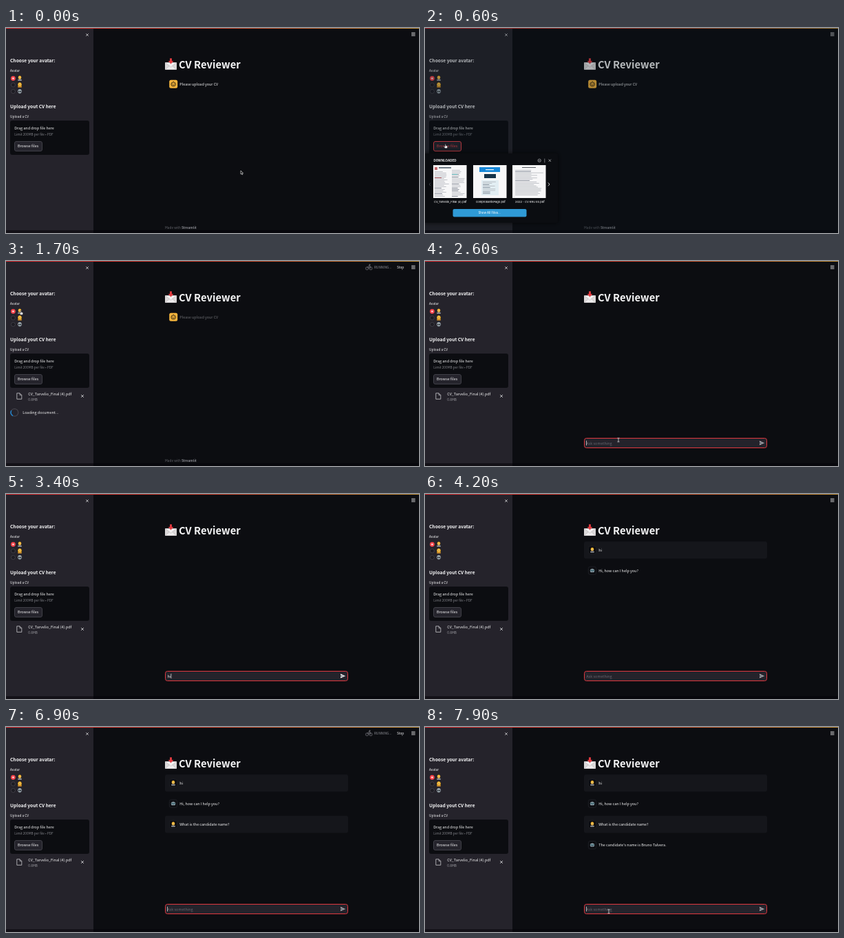
Animation of 600x299 px, one loop 8 s. Source, as an HTML page with a canvas:

```html
<!DOCTYPE html>
<html lang="en">
<head>
<meta charset="utf-8">
<title>CV Reviewer</title>
<style>
  html, body { margin: 0; width: 100%; height: 100%; overflow: hidden; background: #0c0d11; }
  canvas { display: block; width: 600px; height: 299px; }
</style>
</head>
<body>
<canvas id="stage" width="600" height="299"></canvas>
<script>
const ctx = document.getElementById('stage').getContext('2d');
const LOOP = 8000;
const SANS = '"Noto Sans CJK JP", "Noto Sans CJK SC", "Noto Sans CJK", Lato, sans-serif';
const UI = 'Inter, sans-serif';
const WHITE = '#f6f6f7', GRAY = '#85868c', RED = '#f2434a';
const BODY = 6.05, SMALL = 5.3;
const LATIN_RATIO = 1.117; // Latin letters in the CJK face are drawn this much larger
const FILE = 'CV_Tarvelio_Final (4).pdf';
const QUESTION = 'What is the candidate name?';

// Moments of the session, in ms
const T = {
  popup: 500, pick: 1080, uploaded: 1250, loading: 1350, ready: 2180, focus: 2480,
  send1: 3550, reply1: 4080, type2: 4900, send2: 6850, reply2: 7450
};

const MOUSE = [
  [0, 341, 208], [100, 341, 208], [430, 30, 172], [650, 30, 172], [900, 38, 226],
  [1150, 38, 226], [1600, 22, 75], [1850, 22, 75], [2400, 281, 261], [2800, 281, 261]
];
const MOUSE_END = [[7550, 290, 273], [7850, 267, 269], [8000, 267, 269]];

function along(keys, t) {
  let i = 1;
  while (i < keys.length - 1 && t > keys[i][0]) i++;
  const [t0, x0, y0] = keys[i - 1], [t1, x1, y1] = keys[i];
  let k = Math.min(1, Math.max(0, (t - t0) / (t1 - t0)));
  k = k * k * (3 - 2 * k);
  return [x0 + (x1 - x0) * k, y0 + (y1 - y0) * k];
}

// Text is laid out at ten times its size so that advances stay fractional.
function text(str, x, y, size = BODY, color = WHITE, weight = 400, family = SANS) {
  const px = size / (family === SANS ? LATIN_RATIO : 1);
  ctx.save();
  ctx.translate(x, y);
  ctx.scale(0.1, 0.1);
  ctx.font = `${weight} ${px * 10}px ${family}`;
  ctx.fillStyle = color;
  ctx.fillText(str, 0, 0);
  const width = ctx.measureText(str).width / 10;
  ctx.restore();
  return width;
}

function rect(x, y, w, h, color) {
  ctx.fillStyle = color;
  ctx.fillRect(x, y, w, h);
}

function box(x, y, w, h, r, fill, stroke) {
  ctx.beginPath();
  ctx.roundRect(x, y, w, h, r);
  paint(fill, stroke);
}

function paint(fill, stroke, width = 1) {
  if (fill) { ctx.fillStyle = fill; ctx.fill(); }
  if (stroke) { ctx.strokeStyle = stroke; ctx.lineWidth = width; ctx.stroke(); }
}

function oval(x, y, rx, ry, fill, stroke, width) {
  ctx.beginPath();
  ctx.ellipse(x, y, rx, ry, 0, 0, Math.PI * 2);
  paint(fill, stroke, width);
}

function poly(points, fill, stroke, width, open) {
  ctx.beginPath();
  points.forEach(([x, y]) => ctx.lineTo(x, y));
  if (!open) ctx.closePath();
  paint(fill, stroke, width);
}

function cross(x, y, r, color, width = 0.8) {
  poly([[x - r, y - r], [x + r, y + r]], null, color, width, true);
  poly([[x - r, y + r], [x + r, y - r]], null, color, width, true);
}

function at(x, y, draw, ...args) {
  ctx.save();
  ctx.translate(x, y);
  draw(...args);
  ctx.restore();
}

function person(longHair) {
  if (longHair) box(-2.7, -3, 5.4, 5.6, 2, '#e8a81c');
  box(-3, 1.7, 6, 2.1, 1, longHair ? '#c98a2a' : '#8b8f98');
  oval(0, -1.2, 2.3, 2.5, '#f3b02c');
  oval(0, -0.4, 1.6, 1.9, '#ffd264');
  rect(-0.9, -0.7, 0.6, 0.6, '#5a3b16');
  rect(0.4, -0.7, 0.6, 0.6, '#5a3b16');
  rect(-0.6, 0.6, 1.2, 0.4, '#9b5b2a');
}

function alien() {
  oval(0, -0.2, 2.8, 3.1, '#a9b6bd');
  oval(-1.2, 0.1, 0.9, 1.1, '#15181d');
  oval(1.2, 0.1, 0.9, 1.1, '#15181d');
  rect(-0.6, 1.8, 1.2, 0.4, '#4b5459');
}

function robot() {
  rect(-0.3, -3.4, 0.6, 1.4, '#9aa7ae');
  box(-2.8, -2.2, 5.6, 4.6, 1.3, '#a7bcc6');
  box(-3.4, -0.8, 6.8, 1.6, 0.6, '#56747f');
  oval(-1.2, -0.4, 0.8, 0.8, '#1d4d58');
  oval(1.2, -0.4, 0.8, 0.8, '#1d4d58');
  rect(-1.4, 1.1, 2.8, 0.6, '#34424a');
}

function robotBadge() {
  box(-6, -6, 12, 12, 2.5, '#f3b33c');
  oval(0, 0.3, 3.3, 3, null, '#33260f', 0.9);
  oval(-1.3, 0, 0.7, 0.7, '#33260f');
  oval(1.3, 0, 0.7, 0.7, '#33260f');
  rect(-1.2, 1.5, 2.4, 0.6, '#33260f');
  rect(-0.4, -4, 0.8, 1.4, '#33260f');
}

function envelope() {
  box(0, 6, 17, 11, 1, '#dcd9da');
  poly([[0.5, 16.5], [6.5, 11], [10.5, 11], [16.5, 16.5]], '#eeeced', '#b5b0b3', 0.6);
  poly([[0.5, 6.5], [8.5, 13], [16.5, 6.5]], '#f3f1f2', '#b5b0b3', 0.6);
  poly([[7, 0.3], [10, 0.3], [10, 4], [12.4, 4], [8.5, 8.6], [4.6, 4], [7, 4]], '#e03a3f');
}

function arrowCursor() {
  poly([[0, 0], [0, 5.2], [1.2, 4.2], [2, 6], [2.9, 5.6], [2.1, 3.9], [3.7, 3.8]], '#111', '#eee', 0.6);
}

function handCursor() {
  poly([[-0.9, -2.8], [0.1, -2.8], [0.2, -0.4], [2.7, 0.2], [2.6, 2.2], [1.9, 3.5],
        [-0.9, 3.5], [-2.7, 0.9], [-2.1, 0.3], [-0.9, 1.2]], '#f5f5f5', '#15151a', 0.5);
}

function beamCursor() {
  rect(-0.4, -2.8, 0.8, 5.6, '#dcdcde');
  rect(-1.6, -3.2, 3.2, 0.7, '#dcdcde');
  rect(-1.6, 2.5, 3.2, 0.7, '#dcdcde');
}

function background() {
  rect(0, 0, 600, 299, '#0c0d11');
  rect(0, 0, 127, 299, '#25232b');
  rect(0, 295, 600, 4, 'rgba(4,2,8,0.55)');
  const line = ctx.createLinearGradient(0, 0, 600, 0);
  line.addColorStop(0, '#d42a30');
  line.addColorStop(0.5, '#c8402d');
  line.addColorStop(1, '#b98a35');
  rect(0, 0, 600, 1, line);
}

function sidebar(t) {
  cross(118, 10, 1.8, '#d6d6d9');
  text('Choose your avatar:', 6, 50, 7.45, WHITE, 700);
  text('Avatar', 6, 64.4, SMALL);
  [73.5, 83, 92.5].forEach((y, i) => {
    if (i) oval(10.4, y, 3, 3, '#1d1c23', '#4b4a52', 0.7);
    else {
      oval(10.4, y, 3.4, 3.4, RED);
      oval(10.4, y, 1.3, 1.3, '#ffe3e3');
    }
  });
  at(20, 73.3, person, false);
  at(20, 83, person, true);
  at(20, 92.5, alien);

  text('Upload yout CV here', 6, 116.7, 7.45, WHITE, 700);
  text('Upload a CV', 6, 131, SMALL + 0.1);
  box(6, 135, 115, 50, 3, '#0c0d11');
  text('Drag and drop file here', 12.3, 148.1);
  text('Limit 200MB per file • PDF', 12.3, 157.3, SMALL, GRAY);
  const hover = t > 400 && t < 700;
  box(12.5, 165.5, 40, 14, 2.5, '#25242c', hover ? RED : '#3f3f47');
  text('Browse files', 17, 174.2, BODY, hover ? RED : WHITE);

  if (t >= T.uploaded) {
    poly([[15.8, 192.8], [20, 192.8], [22.8, 195.6], [22.8, 201.4], [15.8, 201.4]], null, '#c9c9cd', 0.8);
    poly([[20, 192.8], [20, 195.6], [22.8, 195.6]], null, '#c9c9cd', 0.7, true);
    text(FILE, 32.3, 196.2);
    text('0.8MB', 32.3, 204.3, SMALL, '#a0a0a6');
    cross(111, 197, 1.9, '#e4e4e6');
  }
  if (t >= T.loading && t < T.ready) {
    oval(12.4, 221, 5.4, 5.4, null, '#45444c', 1.2);
    const a = 2 + (t - 1700) / 1000 * Math.PI * 2;
    ctx.beginPath();
    ctx.arc(12.4, 221, 5.4, a, a + 1.7);
    paint(null, '#2187d3', 1.4);
    text('Loading document...', 24.3, 223.1);
  }
}

function toolbar(t) {
  for (const y of [7, 9, 11]) rect(589, y - 0.4, 5.5, 0.9, '#dadadc');
  const busy = (t >= T.loading && t < T.ready) || (t >= T.send1 && t < T.reply1) ||
    (t >= T.send2 && t < T.reply2);
  if (!busy) return;
  oval(524.5, 10.8, 2.1, 2.1, null, '#77787e', 0.7);
  oval(530, 10.8, 2.1, 2.1, null, '#77787e', 0.7);
  poly([[524.5, 10.8], [526, 8], [529, 8], [527.3, 10.8], [526, 8]], null, '#77787e', 0.6, true);
  poly([[530, 10.8], [528.6, 6.8], [526.6, 6.2]], null, '#77787e', 0.7, true);
  oval(528.5, 5.5, 0.9, 0.9, '#77787e');
  text('RUNNING...', 535, 11.2, SMALL, '#919299');
  text('Stop', 568, 11.2, SMALL, WHITE, 500);
}

function message(str, y, isUser) {
  if (isUser) box(231, y - 12.5, 266, 25, 3, '#15161b');
  box(237.3, y - 5.7, 11.4, 11.4, 2.5, '#0c0d11', '#1d1e24');
  at(243, y, isUser ? person : robot);
  text(str, 252.3, y + 1.9);
}

function draft(t) {
  if (t >= 2900 && t < T.send1) return 'hi'.slice(0, t < 3150 ? 1 : 2);
  if (t < T.type2 || t >= T.send2) return '';
  const slow = Math.min(8, 1 + Math.floor((t - T.type2) / 100));
  return QUESTION.slice(0, slow + Math.max(0, Math.ceil((t - 5750) / 45)));
}

function promptBar(t) {
  const typed = draft(t);
  const focused = t >= T.focus;
  box(231.5, 258.5, 265, 14, 3, '#24232b', focused ? '#e0383f' : '#24232b');
  const width = text(typed || 'Ask something', 234.4, 267.6, BODY, typed ? WHITE : '#67676f');
  const since = t >= T.send2 ? T.send2 : t >= T.send1 ? T.send1 : T.focus;
  if (focused && (typed || (t - since) % 1000 < 500)) {
    rect(typed ? 234.8 + width : 234, 262, 0.7, 7, '#e6e6e8');
  }
  poly([[486, 262.2], [493.2, 265.4], [486, 268.6], [486, 266], [490.5, 265.4], [486, 264.8]],
    typed ? '#e8e8ea' : '#a4a4aa');
}

function mainPane(t) {
  at(231, 44, envelope);
  text('CV Reviewer', 251, 59.2, 16.5, WHITE, 700);
  if (t < T.ready) {
    at(243.2, 81.7, robotBadge);
    text('Please upload your CV', 252.3, 83.6, BODY, t < T.loading ? WHITE : '#6d6e73');
    const w = text('Made with ', 231, 293.4, SMALL, '#65666c');
    text('Streamlit', 231 + w, 293.4, SMALL, '#8b8c92', 700);
    return;
  }
  if (t >= T.send1) message('hi', 81.7, true);
  if (t >= T.reply1) message('Hi, how can I help you?', 111.8, false);
  if (t >= T.send2) message(QUESTION, 142, true);
  if (t >= T.reply2) message("The candidate's name is Bruno Talvera.", 172.2, false);
  promptBar(t);
}

// Rows of grey strokes that read as a printed page
function textRows(x, y, w, rows, step, seed) {
  for (let i = 0; i < rows; i++) {
    const r = Math.abs(Math.sin((i + 1) * 12.9898 + seed) * 43758.5) % 1;
    rect(x, y + i * step, w * (0.45 + 0.55 * r), 0.7, r < 0.2 ? '#5c6472' : '#a9adb3');
  }
}

function thumbnails() {
  for (const x of [12, 70, 127]) rect(x, 200, 48.5, 48, '#f7f7f8');
  rect(20, 203, 18, 1.6, '#52606d');
  rect(14, 203, 4, 4, '#c66b70');
  textRows(14, 209, 21, 19, 2, 1);
  textRows(39, 207, 19, 20, 2, 4);
  rect(39, 213, 8, 1, '#4aa1a8');
  rect(14, 218, 10, 1, '#c66b70');

  rect(79, 203, 30, 7, '#1687d8');
  rect(86, 213, 17, 6, '#163349');
  rect(82, 222, 25, 22, '#e2eef3');
  textRows(84, 224, 20, 9, 2.1, 7);
  rect(88, 206, 12, 1.2, '#e8f6ff');

  rect(141, 203, 20, 1, '#555a61');
  textRows(131, 207, 41, 20, 1.9, 2);
}

function popup() {
  ctx.save();
  ctx.shadowColor = 'rgba(0,0,0,0.7)';
  ctx.shadowBlur = 7;
  box(-4, 183, 197, 101, 3, '#0b0d11');
  ctx.restore();
  text('DOWNLOADED', 12.5, 195.2, 4.5, '#e9e9ea', 700, UI);
  oval(166.2, 193.3, 2.2, 2.2, null, '#b9babd', 0.7);
  rect(165.2, 193, 2, 0.7, '#b9babd');
  rect(173.5, 190.5, 0.7, 6, '#9a9b9f');
  cross(181.3, 193.3, 1.7, '#d0d0d2', 0.7);
  thumbnails();
  text(FILE, 13, 255.3, 4, '#e5e5e6', 500, UI);
  text('comprobantePago.pdf', 74, 255.3, 4, '#e5e5e6', 500, UI);
  text('2022 - CV KRU ES.pdf', 131, 255.3, 4, '#e5e5e6', 500, UI);
  poly([[8, 225.8], [6.2, 228], [8, 230.2]], null, '#4a4c52', 0.8, true);
  poly([[178.8, 225.6], [181, 228], [178.8, 230.4]], null, '#d8d8da', 0.9, true);
  box(40.5, 264, 107, 11.5, 2, '#2f9ad6');
  text('Show All Files...', 77.5, 271.3, 4.3, '#f0f8fd', 500, UI);
}

function pointer(t) {
  if (t < 2850) {
    const [x, y] = along(MOUSE, t);
    const overLink = (t > 400 && t < 720) || (t > 1500 && t < 1950);
    const overInput = t > 2330;
    at(x, y, overInput ? beamCursor : overLink ? handCursor : arrowCursor);
  } else if (t >= 7550) {
    at(...along(MOUSE_END, t), beamCursor);
  }
}

function draw(t) {
  background();
  sidebar(t);
  toolbar(t);
  mainPane(t);
  if (t >= T.popup && t < T.pick) {
    const dim = Math.min(1, (t - T.popup) / 100) * 0.27;
    rect(0, 0, 600, 299, `rgba(10,20,28,${dim})`);
    popup();
  }
  pointer(t);
}

const start = performance.now();
function tick(now) {
  draw(Math.max(0, now - start) % LOOP);
  requestAnimationFrame(tick);
}
requestAnimationFrame(tick);
</script>
</body>
</html>
```
